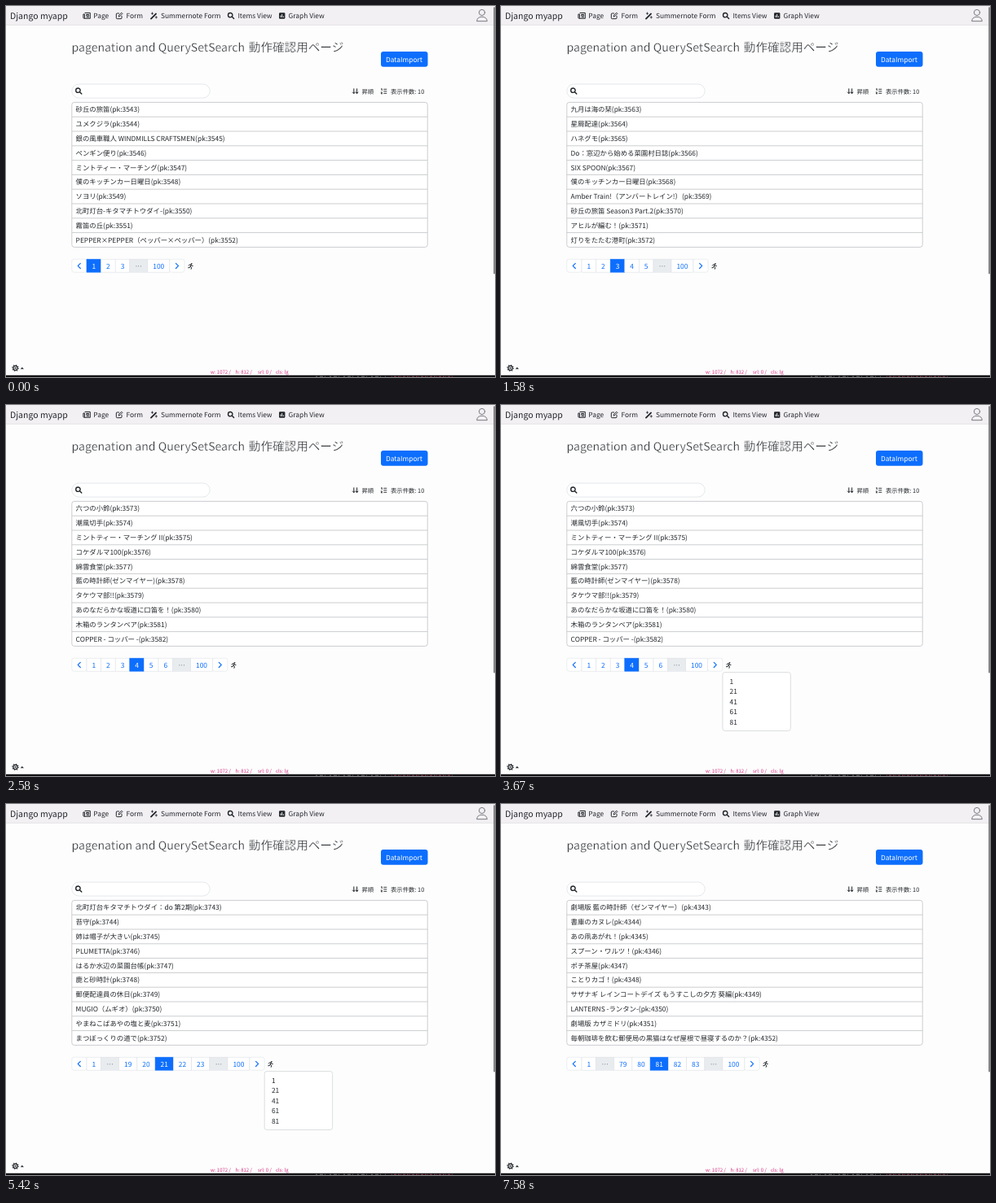
These frames come from a looping animation (600x456 px, 8000 ms). An HTML page:

```html
<!DOCTYPE html>
<html lang="ja">
<head>
<meta charset="utf-8">
<title>Pagination</title>
<style>
  html, body { margin: 0; width: 100%; height: 100%; overflow: hidden; background: #fdfdfd; }
  svg { display: block; width: 600px; height: 456px; }
  text { font: 8.4px "Noto Sans CJK JP", "Noto Sans CJK", sans-serif; fill: #24282c; white-space: pre; text-rendering: geometricPrecision; }
  .brand { font-size: 10.5px; }
  /* The page-coloured outline thins the strokes to a light weight. */
  .title { font-size: 14.1px; fill: #303438; stroke: #fdfdfd; stroke-width: .3; }
  .title.kanji { font-size: 14.6px; }
  .small { font-size: 7.35px; }
  .info { font-size: 6px; fill: #d63384; }
  .mid { text-anchor: middle; }
  .line { fill: none; stroke: #212529; stroke-linecap: round; stroke-linejoin: round; }
  .box { fill: #fff; stroke: #dee2e6; stroke-width: .8; }
</style>
</head>
<body>
<svg viewBox="0 0 600 456">
  <defs>
    <g id="lens" class="line" stroke-width="1.4"><circle cx="-.8" cy="-.8" r="2.7"/><path d="M1.3 1.3 3.6 3.6"/></g>
  </defs>

  <rect width="600" height="23" fill="#f3f0f4"/>
  <path d="M0 23.4H600" stroke="#e3e0e4" stroke-width=".8"/>
  <text class="brand" x="5" y="15.8">Django myapp</text>
  <text x="107.3" y="15">Page</text>
  <text x="147.4" y="15">Form</text>
  <text x="190" y="15">Summernote Form</text>
  <text x="284.4" y="15">Items View</text>
  <text x="346.5" y="15">Graph View</text>

  <g class="line" stroke-width="1">
    <path d="M97 8.5h6.3v6.8h-7.4q-1 0-1-1V10h1.5v4.5M99 10.5h2.6v1.4H99zM99 13.6h2.6"/>
    <path d="M138.5 9h-2.2q-1 0-1 1v4.7q0 1 1 1h4.7q1 0 1-1v-2.2M138.3 12.8l.4-1.6 3-3 1.2 1.2-3 3z"/>
    <path d="M178 15.6 184 9.6" stroke-width="1.9"/>
    <path d="M179.5 8v2.4M178.3 9.2h2.4M184.3 12.7v2.4M183.1 13.9h2.4" stroke-width=".8"/>
    <g stroke="#6a6e72" stroke-width=".9">
      <circle cx="584" cy="8" r="3.6"/>
      <path d="M577.7 18.3q.5-5 6.3-5t6.300 5z"/>
    </g>
  </g>
  <use href="#lens" x="276" y="12"/>
  <rect x="335" y="8.3" width="7.4" height="7.4" rx="1.2" fill="#212529"/>
  <path d="M337 14v-2.5M338.7 14v-4M340.4 14v-1.5" stroke="#fff" stroke-width=".9"/>

  <text class="title" x="80.5" y="56.4">pagenation and QuerySetSearch</text>
  <text class="title kanji" x="297.8" y="56.4">動作確認用ページ</text>
  <rect x="460" y="56" width="57.5" height="18.8" rx="3" fill="#0d6efd"/>
  <text x="466" y="68.5" style="fill:#fff">DataImport</text>

  <rect class="box" x="80.8" y="96" width="169.4" height="17" rx="8.5"/>
  <use href="#lens" x="89.2" y="104.5"/>
  <g class="line" stroke-width="1">
    <path d="M426.8 101.8v5.6m-1.4-1.4 1.4 1.5 1.4-1.5M430.6 101.8v5.6m-1.4-1.4 1.4 1.5 1.4-1.5"/>
    <path d="M463.7 102.3h3.2M463.7 104.8h3.2M463.7 107.3h3.2M460.4 102l.8-.4v2M460.2 106h1.3l-1.3 1.8h1.4" stroke-width=".9"/>
  </g>
  <text class="small" x="436.5" y="107.6">昇順</text>
  <text class="small" x="472" y="107.6">表示件数: 10</text>

  <g id="view"></g>

  <g class="line">
    <circle cx="11.5" cy="445" r="2.6" stroke-width="1.2"/>
    <circle cx="11.5" cy="445" r="3.7" stroke-width="1.1" stroke-dasharray="1.2 1.706" stroke-linecap="butt"/>
  </g>
  <circle cx="11.5" cy="445" r="1" fill="#212529"/>
  <path d="M17.7 446.3h4.2l-2.1-2.4z" fill="#212529"/>
  <text class="info" x="251" y="451.7">w: 1072 /</text>
  <text class="info" x="281.5" y="451.7">h: 812 /</text>
  <text class="info" x="309" y="451.7">srl: 0 /</text>
  <text class="info" x="331" y="451.7">cls: lg</text>

  <rect x="598.2" y="1.2" width="1.8" height="328.3" rx=".9" fill="#808082"/>
  <rect y="453.8" width="600" height="2.2" fill="#131316"/>
  <path d="M380 455.3H466" stroke="#66666a" stroke-dasharray="2 3 4 2 1 5"/>
  <path d="M473 455.3H548" stroke="#8a3a4a" stroke-dasharray="1 2 3 2 2 1"/>
</svg>
<script>
const LOOP = 8000, LAST_PAGE = 100, FIRST_PK = 3543;
const BLUE = '#0d6efd', GREY = '#e9ecef', BORDER = '#dee2e6', RULE = '#cbcdd0';

const titles = {
  1: ['砂丘の旅笛', 'ユメクジラ', '銀の風車職人 WINDMILLS CRAFTSMEN', 'ペンギン便り', 'ミントティー・マーチング',
      '僕のキッチンカー日曜日', 'ソヨリ', '北町灯台-キタマチトウダイ-', '霧笛の丘', 'PEPPER×PEPPER（ペッパー×ペッパー）'],
  2: ['雨の窓は。', '砂丘の旅笛 Season2', 'MARBLE;MOON', '僕のキッチンカー日曜日', 'マルメロ村・カモメ新聞',
      'ソヨリ- 木漏日', 'メトロノーム 黄昏のカナリヤ号', '砂丘の旅笛 Season3', '霧の匙', 'もちペン！'],
  3: ['九月は海の栞', '星屑配達', 'ハネグモ', 'Do：窓辺から始める菜園村日誌', 'SIX SPOON',
      '僕のキッチンカー日曜日', 'Amber Train!（アンバートレイン!）', '砂丘の旅笛 Season3 Part.2', 'アヒルが編む！', '灯りをたたむ港町'],
  4: ['六つの小鈴', '潮風切手', 'ミントティー・マーチング II', 'コケダルマ100', '綿雲食堂',
      '藍の時計師(ゼンマイヤー)', 'タケウマ部!!', 'あのなだらかな坂道に口笛を！', '木箱のランタンベア', 'COPPER - コッパー -'],
  21: ['北町灯台キタマチトウダイ：do 第2期', '苔守', '姉は帽子が大きい', 'PLUMETTA', 'はるか水辺の菜園台帳',
      '鹿と砂時計', '郵便配達員の休日', 'MUGIO（ムギオ）', 'やまねこばあやの塩と麦', 'まつぼっくりの道で'],
  81: ['劇場版 藍の時計師（ゼンマイヤー）', '書庫のカヌレ', 'あの凧あがれ！', 'スプーン・ワルツ！', 'ポチ茶屋',
      'ことりカゴ！', 'サザナギ レインコートデイズ もうすこしの夕方 葵編', 'LANTERNS -ランタン-', '劇場版 カザミドリ',
      '毎朝珈琲を飲む郵便局の黒猫はなぜ屋根で昼寝するのか？']
};

// Each visit: page load, then hover and press of the next link (in the bar or the jump menu).
const visits = [
  { at: 0, page: 1, target: 2, hover: 430, press: 750 },
  { at: 920, page: 2, target: 3, hover: 970, press: 1250 },
  { at: 1420, page: 3, target: 4, hover: 2130, press: 2420 },
  { at: 2580, page: 4, menu: 3670, target: 21, press: 4330 },
  { at: 4500, page: 21, menu: 5420, target: 81, press: 6170 },
  { at: 6330, page: 81 }
];

const rect = (x, y, w, h, attrs) => `<rect x="${x}" y="${y}" width="${w}" height="${h}" ${attrs}/>`;
const text = (x, y, s, fill = '#24282c', cls = '') => `<text x="${x}" y="${y}" class="${cls}" style="fill:${fill}">${s}</text>`;
const path = (d, stroke, width) => `<path d="${d}" fill="none" stroke="${stroke}" stroke-width="${width}" stroke-linejoin="round" stroke-linecap="round"/>`;

function list(page) {
  const top = 118.4, pitch = 17.8;
  let out = rect(80.8, top, 436.4, pitch * 10, `rx="3" fill="#fff" stroke="${RULE}"`);
  titles[page].forEach((title, i) => {
    const y = top + i * pitch;
    if (i) out += path(`M81 ${y}H517`, RULE, 1);
    out += text(85.6, y + 12, `${title}(pk:${FIRST_PK + (page - 1) * 10 + i})`);
  });
  return out;
}

function barItems(page) {
  const items = ['prev'], low = Math.max(1, page - 2), high = page + 2;
  if (low > 1) items.push(1);
  if (low > 2) items.push('…');
  for (let n = low; n <= high; n++) items.push(n);
  return [...items, '…', LAST_PAGE, 'next'];
}

function cellWidth(item) {
  if (item === '…') return 22;
  return typeof item === 'string' ? 18.2 : 12.94 + 4.66 * String(item).length;
}

function bar(visit, t) {
  const y = 311.2, h = 16;
  let x = 80.8, cells = '', ring = '';
  for (const item of barItems(visit.page)) {
    const w = cellWidth(item), mid = x + w / 2;
    const active = item === visit.page, gap = item === '…';
    const hovered = item === visit.target && visit.hover && t > visit.hover;
    const round = typeof item === 'string' && !gap ? 'rx="2.5"' : '';
    cells += rect(x, y, w, h, `${round} fill="${active ? BLUE : gap ? GREY : '#fff'}" stroke="${active ? BLUE : BORDER}" stroke-width=".6"`);
    if (hovered) {
      cells += rect(x, y, w, h, `fill="${GREY}" opacity="${Math.min(1, (t - visit.hover) / 150)}"`);
      if (t >= visit.press) ring = rect(x - 1, y - 1, w + 2, h + 2, `fill="none" stroke="${BLUE}" stroke-opacity=".25" stroke-width="2.1"`);
    }
    if (item === 'prev') cells += path(`M${mid + 1.4} 316.3l-3.1 3.1 3.1 3.1`, BLUE, 1.2);
    else if (item === 'next') cells += path(`M${mid - 1.4} 316.3l3.1 3.1-3.1 3.1`, BLUE, 1.2);
    else cells += text(mid, 322.5, item, active ? '#fff' : gap ? '#6c757d' : hovered ? '#0a58ca' : BLUE, 'mid');
    x += w;
  }
  return { svg: cells + ring, end: x };
}

function runner(x) {
  return `<circle cx="${x + 1.2}" cy="316.8" r=".9" fill="#212529"/>` +
    path(`M${x - 2.2} 319l1-1.2 1.7.3-.9 2.3 1.6 1-.6 1.9M${x - .6} 320.4l-.7 1.2-1.5.1M${x + .5} 318.1l.9 1.3h1.3`, '#212529', 1);
}

function menu(x, visit, t) {
  const y = 328.5, width = 83.4, pitch = 12.6;
  let out = rect(x, y, width, 72, 'rx="3" fill="#fff" stroke="#d3d6d9" stroke-width=".8"');
  [1, 21, 41, 61, 81].forEach((n, i) => {
    const pressed = n === visit.target && t >= visit.press;
    if (pressed) out += rect(x, y + 4.5 + i * pitch, width, pitch, `fill="${BLUE}"`);
    out += text(x + 8.7, y + 14 + i * pitch, n, pressed ? '#fff' : undefined);
  });
  return out;
}

function render(t) {
  const visit = visits.findLast(v => v.at <= t);
  const { svg, end } = bar(visit, t);
  return list(visit.page) + svg + runner(end + 7.6) +
    (t >= visit.menu ? menu(end + .2, visit, t) : '');
}

const view = document.getElementById('view');
let shown = '';
function frame() {
  const next = render(performance.now() % LOOP);
  if (next !== shown) view.innerHTML = shown = next;
  requestAnimationFrame(frame);
}
frame();
</script>
</body>
</html>
```
